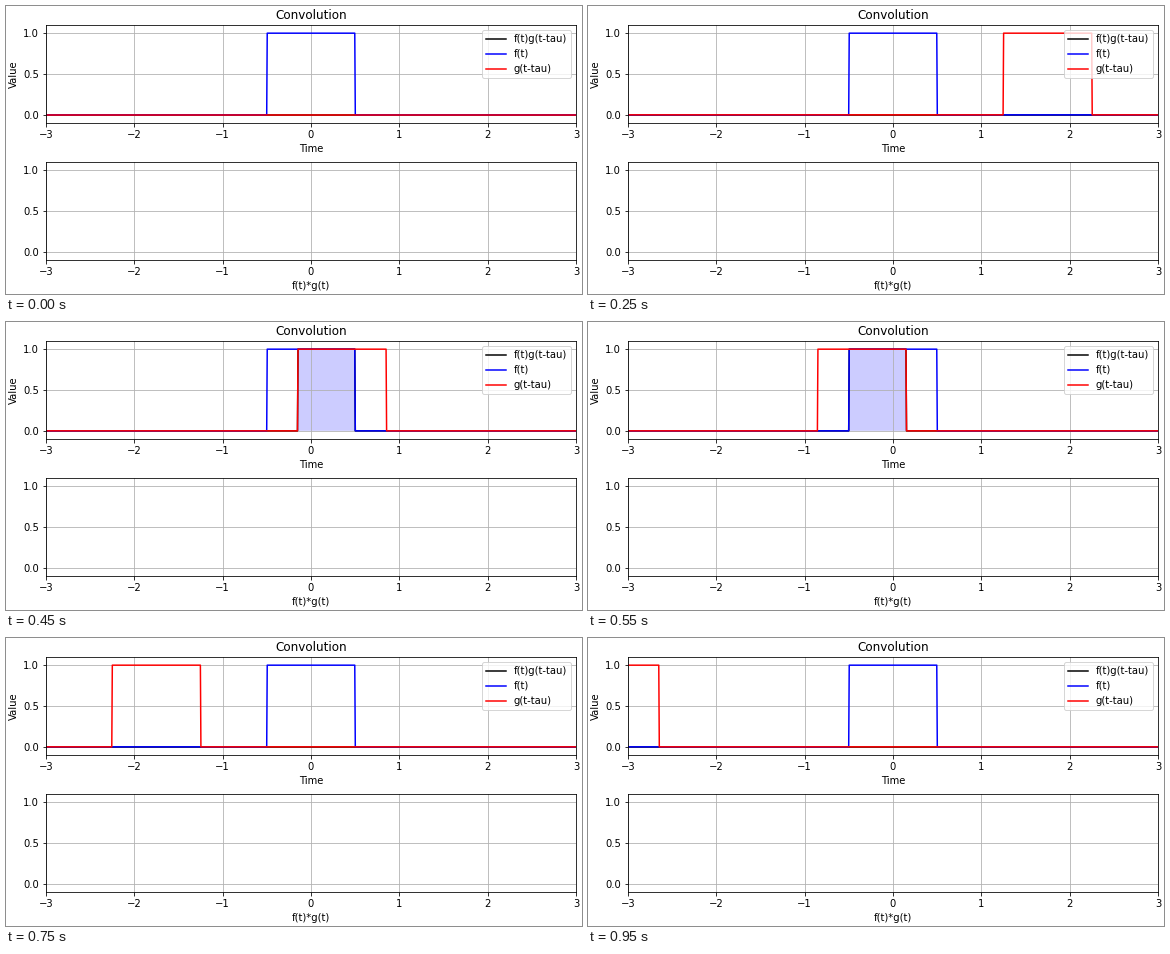
Recreate the animation shown at these times as a matplotlib script. Size 576 by 288 pixels, loop 1 s.

```python
import numpy as np
import matplotlib.pyplot as plt
from matplotlib.animation import FuncAnimation

WIDTH, HEIGHT, DPI = 576, 288, 72
FRAMES, INTERVAL = 20, 50
START, STEP = 3.5, 0.35

plt.rcParams.update({"font.family": "DejaVu Sans", "font.size": 10})

t = np.linspace(-3, 3, 1000)


def pulse(x):
    """Unit-width rectangular pulse centred on zero."""
    return np.where(np.abs(x) < 0.5 - 1e-9, 1.0, 0.0)


def make_axes(fig, bottom, xlabel):
    ax = fig.add_axes([40 / WIDTH, bottom / HEIGHT, 530 / WIDTH, 98 / HEIGHT])
    ax.set(xlim=(-3, 3), ylim=(-0.1, 1.1), xlabel=xlabel,
           xticks=range(-3, 4), yticks=[0, 0.5, 1])
    ax.grid(True)
    return ax


fig = plt.figure(figsize=(WIDTH / DPI, HEIGHT / DPI), dpi=DPI)
top = make_axes(fig, 171, "Time")
top.set(title="Convolution", ylabel="Value")
make_axes(fig, 34, "f(t)*g(t)")

f = pulse(t)
overlap, = top.fill(t, 0 * t, facecolor="blue", alpha=0.2, linewidth=0)
product_line, = top.plot(t, 0 * t, color="black", label="f(t)g(t-tau)")
top.plot(t, f, color="blue", label="f(t)")
g_line, = top.plot(t, 0 * t, color="red", label="g(t-tau)")
top.legend(loc="upper right")


def update(frame):
    g = pulse(t - (START - STEP * frame))
    product = f * g
    g_line.set_ydata(g)
    product_line.set_ydata(product)
    overlap.set_xy(np.column_stack([t, product]))
    return overlap, product_line, g_line


animation = FuncAnimation(fig, update, frames=FRAMES, interval=INTERVAL,
                          repeat=True, repeat_delay=0)
plt.show()
```
